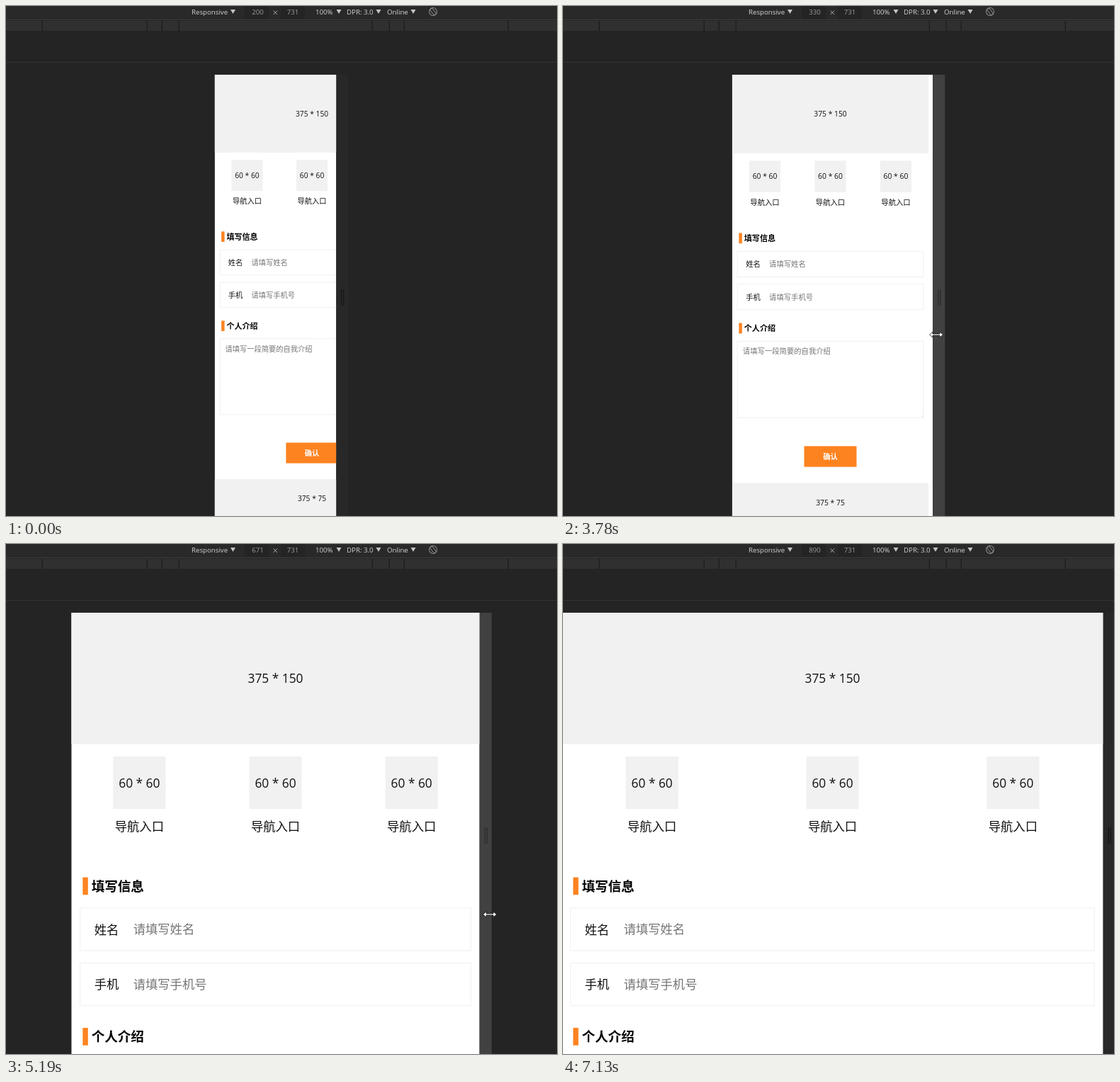
Write an HTML page that moves like this. It is 778 px wide and 720 px high and loops after 7.68 s.

```html
<!DOCTYPE html>
<html lang="en">
<head>
<meta charset="utf-8">
<title>Responsive form</title>
<style>
  html, body { margin: 0; width: 100%; height: 100%; overflow: hidden; background: #242424; }
  #stage { display: block; width: 778px; height: 720px; }
  text { font-family: "Open Sans", "Noto Sans CJK SC", "Noto Sans CJK", sans-serif; }
  .bar text { font-size: 9.7px; fill: #d4d4d4; }
  .bar .num { fill: #9c9c9c; text-anchor: middle; }
  .line { fill: none; stroke: #eee; stroke-width: .9; vector-effect: non-scaling-stroke; }
</style>
</head>
<body>
<svg id="stage" viewBox="0 0 778 720"></svg>
<script>
const LOOP = 7680, SCALE = 0.859, MID = 380.5, TOP = 97;
const GREY = '#f1f1f1', ORANGE = '#fd8320', HINT = '#757575';

// Pointer moves: start, end, steps, from x, y, to x, y
const MOVES = [
  [380, 760, 6, 676, 700, 431, 507],
  [930, 1300, 6, 415, 505, 297, 495],
  [1530, 1770, 4, 322, 494, 421, 489],
  [1930, 2000, 2, 430, 492, 437, 496],
  [2170, 2550, 6, 444, 491, 471, 464],
  [6750, 7130, 6, 773, 549, 800, 553]
];

// Drag of the handle: step, device width, pointer lead, pointer y
const DRAG = { start: 2860, end: 6500, count: 48, keys: [
  [0, 216, 4, 464], [2, 232, 4.3, 464], [9, 290, 10, 464], [11, 323, 5, 464],
  [12, 330, 4.8, 464], [19, 427, 24, 482], [25, 548, 30, 506], [29, 651, 15, 520],
  [37, 812, 9.8, 543], [39, 823, 16, 545], [47, 886, 9.5, 548]
] };

const stage = document.getElementById('stage');
function el(tag, attrs, parent, content) {
  const node = document.createElementNS('http://www.w3.org/2000/svg', tag);
  set(node, attrs);
  if (content) node.textContent = content;
  parent.appendChild(node);
  return node;
}
function set(node, attrs) {
  for (const name in attrs) node.setAttribute(name, attrs[name]);
}
const rect = (parent, x, y, width, height, fill) =>
  el('rect', { x, y, width, height, fill }, parent);

// Toolbar and media query ruler
const bar = el('g', { class: 'bar' }, stage);
rect(bar, 0, 0, 778, 19, '#292929');
rect(bar, 337, 0, 34, 18, '#242424');
rect(bar, 388, 0, 34, 18, '#242424');
rect(bar, 0, 19, 778, 1, '#3d3d3d');
rect(bar, 0, 21, 778, 14, '#303030');
for (const x of [51, 199, 220, 244, 517, 541, 562, 709]) rect(bar, x - .5, 21, 1.5, 14, '#1f1f1f');
rect(bar, 0, 79, 778, 1, '#343434');
function menu(x, label, arrow) {
  el('text', { x, y: 12 }, bar, label);
  el('path', { d: `M${arrow} 5h7l-3.5 6z`, fill: '#c4c4c4' }, bar);
}
menu(262, 'Responsive', 317);
menu(437, '100%', 466.5);
menu(481, 'DPR: 3.0', 522.5);
menu(538, 'Online', 571.5);
const counter = el('text', { x: 355.5, y: 12, class: 'num' }, bar, '200');
el('text', { x: 405, y: 12, class: 'num' }, bar, '731');
el('path', { d: 'M377.5 6.5l5.5 5.5m0-5.5l-5.5 5.5', stroke: '#aaa' }, bar);
const turn = el('g', { transform: 'translate(603 8) rotate(-38)', stroke: '#8a8a8a', fill: 'none' }, bar);
el('circle', { r: 5.5 }, turn);
el('rect', { x: -2, y: -5, width: 4, height: 10 }, turn);

// Page, measured in design units of a 375 wide layout
const page = el('svg', { y: TOP, height: 731 * SCALE }, stage);
rect(page, 0, 0, '100%', '100%', '#fff');
const body = el('g', {}, page);
const wide = [], placed = [];

function stretch(node, inset) {
  wide.push([node, inset]);
}
function column(part) {
  const g = el('g', {}, body);
  placed.push([g, part]);
  return g;
}
function text(parent, x, y, label, size = 14, attrs = {}) {
  const shift = /\d/.test(label) ? .36 : .38;
  el('text', { x, y: y + size * shift, 'font-size': size, fill: '#111', ...attrs }, parent, label);
}
const centred = (parent, y, label, attrs) =>
  text(parent, 0, y, label, 14, { 'text-anchor': 'middle', ...attrs });
function heading(y, label) {
  rect(body, 13, y, 6, 20, ORANGE);
  text(body, 23, y + 10, label, 15, { 'font-weight': 700, fill: '#000' });
}
const frame = (y, height) =>
  stretch(el('rect', { x: 10, y, height, class: 'line' }, body), 20);
function field(y, label, hint) {
  frame(y, 48.7);
  text(body, 26.2, y + 24.6, label);
  text(body, 70.7, y + 24.2, hint, 14, { fill: HINT });
}
function banner(y, height, label) {
  stretch(rect(body, 0, y, 375, height, GREY), 0);
  centred(column(1 / 2), y + height / 2, label);
}

banner(0, 150, '375 * 150');
for (const part of [1 / 6, 1 / 2, 5 / 6]) {
  const nav = column(part);
  rect(nav, -30, 164, 60, 60, GREY);
  centred(nav, 194.3, '60 * 60');
  centred(nav, 243.6, '导航入口');
}
heading(302, '填写信息');
field(337, '姓名', '请填写姓名');
field(399.7, '手机', '请填写手机号');
heading(473.8, '个人介绍');
frame(508.5, 146.2);
el('path', { d: 'M-13 653l2-2', stroke: '#aaa', 'stroke-width': .7 }, column(1));
text(body, 20.4, 527.7, '请填写一段简要的自我介绍', 14, { fill: HINT });
const button = column(1 / 2);
rect(button, -50, 708.7, 100, 39.6, ORANGE);
centred(button, 728.7, '确认', { 'font-weight': 700, fill: '#fff' });
banner(779, 75, '375 * 75');

// Resize strip and pointers
const strip = el('g', {}, stage);
const stripFill = rect(strip, 0, TOP, 17, 640, '#282828');
const grip = el('path', { d: 'M7.5 400v23M10.5 400v23' }, strip);
const shape = d => el('path', { d, fill: '#fff', stroke: '#000', 'stroke-width': .7 }, stage);
const pointers = {
  arrow: shape('M0 0v15l3.5-3.2 2.4 5.2 2.3-1-2.4-5h4.7z'),
  dot: el('circle', { r: 8, fill: '#555', 'fill-opacity': .7, stroke: '#555', 'stroke-opacity': .5 }, stage),
  resize: shape('M-9.5 0l4.5-4v3h10v-3l4.5 4-4.5 4v-3h-10v3z')
};

const mix = (a, b, f) => a + (b - a) * f;
const clamp = (v, low, high) => Math.min(high, Math.max(low, v));

function along(keys, step) {
  const next = keys.findIndex(key => key[0] >= step);
  if (next < 1) return keys[0];
  const a = keys[next - 1], b = keys[next];
  return a.map((v, i) => mix(v, b[i], (step - a[0]) / (b[0] - a[0])));
}

// 9 ms of slack absorbs the 10 ms clock of the steps
const stepAt = (t, start, end, count) =>
  clamp(Math.floor((t - start + 9) * (count - 1) / (end - start)), 0, count - 1);

function pose(t) {
  const move = MOVES.filter(m => m[0] <= t).pop();
  if (t >= DRAG.start && move[0] < DRAG.start) {
    const step = stepAt(t, DRAG.start, DRAG.end, DRAG.count);
    const [, w, lead, y] = along(DRAG.keys, step);
    const last = along(DRAG.keys, Math.max(0, step - 1))[1];
    return { w, last, x: MID + w * SCALE / 2 + lead, y, scroll: 0, held: true };
  }
  if (!move) return { w: 200, last: 200, x: 800, y: 720, scroll: 0 };
  const [start, end, count, x0, y0, x1, y1] = move;
  const step = stepAt(t, start, end, count);
  const f = 1 - (1 - step / (count - 1)) ** 3;
  const held = start > DRAG.end;
  const x = mix(x0, x1, f), w = held ? (step ? 890 : 888) : 200;
  const swiped = start > 900 && start < 1900;
  return { w, last: w, x, y: mix(y0, y1, f), held, scroll: swiped ? clamp(421 - x, 0, 103) : 0 };
}

function kindOf(p, edge) {
  if (p.x > 799) return '';
  if (p.held) return 'resize';
  if (p.x < edge) return 'dot';
  return p.x < edge + 17 ? 'resize' : 'arrow';
}

function render(t) {
  const p = pose(t), edge = MID + p.w * SCALE / 2;
  // Painting trails the handle by one step while the page is narrow
  const outer = p.w < 260 ? p.last : p.w;
  const inner = p.w < 540 ? p.last : p.w;
  const unit = SCALE * clamp(inner, 320, 540) / 375;
  const width = 375 * Math.max(1, inner / 540);

  set(page, { x: MID - outer * SCALE / 2, width: outer * SCALE });
  set(body, { transform: `translate(${-p.scroll} 0) scale(${unit})` });
  for (const [node, inset] of wide) set(node, { width: width - inset });
  for (const [node, part] of placed) set(node, { transform: `translate(${width * part} 0)` });
  counter.textContent = Math.round(p.w);

  const kind = kindOf(p, edge), hot = kind === 'resize';
  set(strip, { transform: `translate(${edge} 0)` });
  set(stripFill, { fill: hot ? '#414141' : '#282828' });
  set(grip, { stroke: hot ? '#262626' : '#121212' });
  for (const name in pointers) {
    set(pointers[name], {
      display: name === kind ? 'inline' : 'none',
      transform: `translate(${p.x} ${p.y})`
    });
  }
}

const begin = performance.now();
function tick() {
  render((performance.now() - begin) % LOOP);
  requestAnimationFrame(tick);
}
tick();
</script>
</body>
</html>
```
